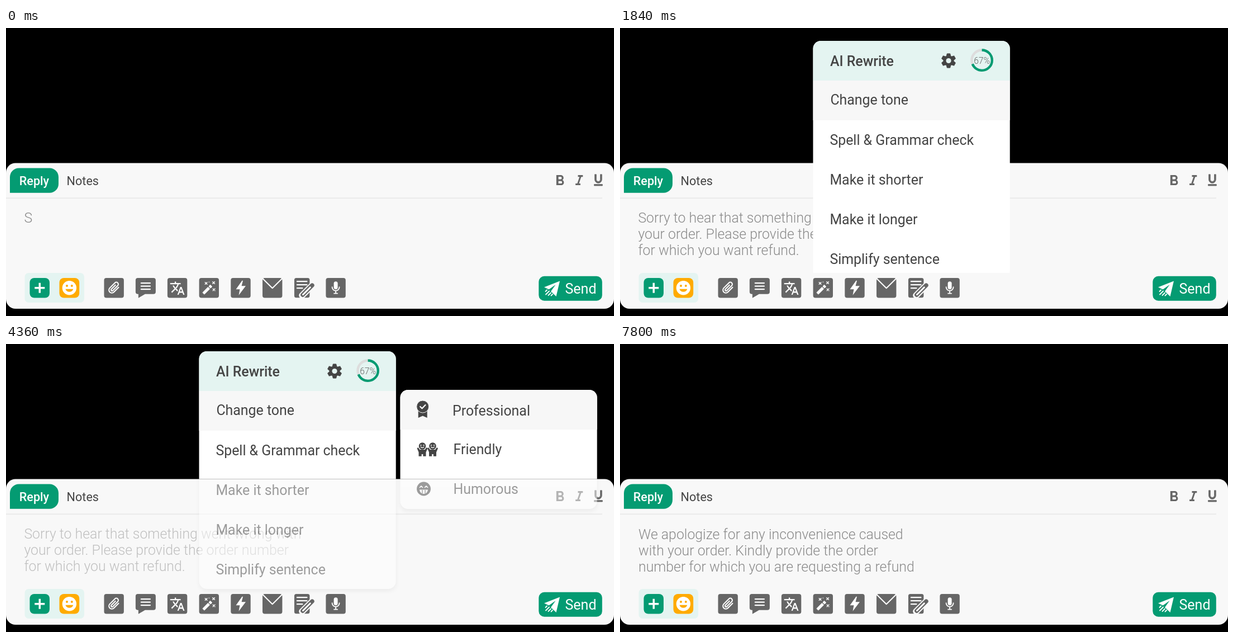
An HTML page for the animation above (9.04 s loop, 1088x515 px).

```html
<!DOCTYPE html>
<html lang="en">
<head>
<meta charset="utf-8">
<title>AI Rewrite</title>
<style>
html, body { margin: 0; width: 100%; height: 100%; overflow: hidden; background: #000; }
svg { display: block; font-family: Roboto, sans-serif; }
text { white-space: pre; }
.green { fill: #049b72; }
.grey { fill: #666; }
.mint { fill: #e4f4f1; }
.line { fill: none; stroke: #fff; stroke-linecap: round; stroke-linejoin: round; }
.white { fill: #fff; }
.dark { fill: #444; }
.item { fill: #444; font-size: 24.9px; }
.tab { font-size: 21.6px; }
.draft { fill: #8a8a8a; font-size: 24.85px; font-weight: 300; }
</style>
</head>
<body>
<svg width="1088" height="515" viewBox="0 0 1088 515">
  <defs>
    <filter id="blur" x="-10%" y="-10%" width="120%" height="120%"><feGaussianBlur stdDeviation="4"/></filter>
    <clipPath id="above"><rect width="1088" height="241"/></clipPath>
    <clipPath id="below"><rect y="241" width="1088" height="261"/></clipPath>
    <clipPath id="backed"><rect y="241" width="1088" height="261"/><rect x="346" y="13" width="352" height="228"/></clipPath>
    <clipPath id="open"><rect x="698" width="390" height="241"/></clipPath>
    <clipPath id="window"><rect id="windowBox" x="345" width="353" height="438"/></clipPath>
    <clipPath id="menuShape"><rect x="345.5" y="13" width="352.2" height="425" rx="14"/></clipPath>
    <clipPath id="toneShape"><rect x="705.5" y="82" width="352.2" height="213" rx="14"/></clipPath>

    <g id="menu"><g id="rise">
      <rect id="menuShadow" x="346" y="15" width="352" height="427" rx="15" filter="url(#blur)"/>
      <g clip-path="url(#menuShape)">
        <rect class="white" x="345" y="13" width="353" height="425"/>
        <rect class="mint" x="345" y="13" width="353" height="71"/>
        <rect x="345" y="84" width="353" height="71" fill="#f7f7f7"/>
      </g>
      <text class="item" x="376" y="58" font-weight="500">AI Rewrite</text>
      <g id="gear" class="dark" transform="translate(588 48.5)"></g>
      <g fill="none" stroke-width="4.3">
        <circle cx="647.6" cy="47.7" r="18.2" stroke="#ddd"/>
        <circle cx="647.6" cy="47.7" r="18.2" stroke="#049b72" pathLength="100" stroke-dasharray="69 100" transform="rotate(-90 647.6 47.7)"/>
      </g>
      <text x="647.6" y="54" font-size="15.6" font-weight="300" fill="#666" text-anchor="middle">67%</text>
      <g id="items"></g>
    </g></g>

    <g id="tone"><g id="slide">
      <rect x="705.5" y="84" width="352" height="215" rx="13" filter="url(#blur)" opacity=".1"/>
      <g clip-path="url(#toneShape)">
        <rect class="white" x="705" y="82" width="353" height="213"/>
        <rect x="705" y="82" width="353" height="71" fill="#f7f7f7"/>
      </g>
      <text class="item" x="799" y="128">Professional</text>
      <text class="item" x="800.5" y="197">Friendly</text>
      <text class="item" x="800.5" y="268">Humorous</text>
      <g transform="translate(745.7 112)">
        <path class="dark" d="M-8 6V20L0 16.500 8 20V6z"/>
        <circle class="dark" r="11" stroke="#f7f7f7" stroke-width="1"/>
        <path class="line" stroke-width="2.2" d="M-4.500 0l3.300 3.300 6-6.200"/>
      </g>
      <g id="friend" transform="translate(745 188)">
        <circle class="dark" cy="-5.500" r="6.300"/>
        <path class="dark" d="M-9.500-1.500L-7.500-3-4.500 1H4.500L7.500-3 9.500-1.500 6.500 5.500V12.800H1.300V9H-1.300V12.800H-6.500V5.500z"/>
        <path class="line" stroke-width="1.3" d="M-3.300-7h1.500M1.800-7h1.500M-2.800-4q2.800 2.800 5.600 0"/>
      </g>
      <use href="#friend" x="18.500"/>
      <g transform="translate(747.5 259)">
        <circle class="dark" r="12.5"/>
        <path class="line" stroke-width="1.7" d="M-7-2.500l2.500-2.500 2.500 2.500M2-2.500l2.500-2.500 2.500 2.500"/>
        <path class="white" d="M-7.500 1.500h15a7.500 7.500 0 0 1-15 0z"/>
        <path stroke="#444" stroke-width="1.3" d="M-2.500 2v6.500M2.500 2v6.500"/>
      </g>
    </g></g>
  </defs>

  <rect y="241.500" width="1088" height="260.500" rx="17" fill="#f8f8f8"/>
  <rect y="303.300" width="1067" height="1.800" fill="#e9e9e9"/>
  <path class="green" d="M7 294.700V266.500a16 16 0 0 1 16-16H78a16 16 0 0 1 16 16V278.700a16 16 0 0 1-16 16z"/>
  <text class="tab white" x="50.500" y="281" font-weight="500" text-anchor="middle">Reply</text>
  <text class="tab dark" x="108.600" y="281">Notes</text>

  <g class="grey">
    <path transform="translate(976 258) scale(1.26 1.28)" d="M15.600 10.790c.97-.67 1.650-1.770 1.650-2.790 0-2.260-1.750-4-4-4H7v14h7.040c2.090 0 3.710-1.700 3.710-3.790 0-1.520-.86-2.820-2.150-3.420zM10 6.300h3a1.700 1.700 0 0 1 0 3.400h-3zM13.500 15.700H10v-3.400h3.500a1.700 1.700 0 0 1 0 3.400z"/>
    <path transform="translate(1012.500 258) scale(1.1 1.28)" d="M10 4v2.400h2.500l-3.600 9.200H6V18h8v-2.400h-2.300l3.600-9.200H18V4z"/>
    <path transform="translate(1047.200 258.500) scale(1.06 1.11)" stroke="#666" stroke-width=".7" d="M12 17c3.310 0 6-2.690 6-6V3h-2.600v8a3.400 3.400 0 0 1-6.800 0V3H6v8c0 3.310 2.690 6 6 6zM5 19v2.200h14V19z"/>
  </g>

  <rect class="mint" x="33.500" y="438" width="106.500" height="53" rx="7"/>
  <rect class="green" x="42.500" y="447" width="35.500" height="35.500" rx="8"/>
  <path stroke="#fff" stroke-width="3.500" d="M51.300 464.700h18M60.300 455.700v18"/>
  <rect x="95.500" y="447" width="35.700" height="35.500" rx="8" fill="#ffab00"/>
  <g transform="translate(113.400 464.700)" fill="#ffab00">
    <circle class="white" r="12.700"/>
    <circle cx="-4.400" cy="-3.600" r="2"/><circle cx="4.400" cy="-3.600" r="2"/>
    <path d="M-7 2h14a7.400 7.400 0 0 1-14 0z"/>
  </g>

  <g id="tools"></g>

  <rect class="green" x="953.300" y="443.700" width="113.500" height="44" rx="10"/>
  <path class="white" d="M991 452.500L963 463.500 971.500 467.500 983.500 459 975 471 984.500 480z"/>
  <path class="line" stroke-width="1.800" d="M972 470.500l-6 6M975 473.500l-4.500 4.500M968 468.500l-2.500 2.500M978 476l-2.500 2.500"/>
  <text class="white" x="1000.500" y="475.300" font-size="25">Send</text>

  <g id="draft"></g>
  <g id="loader" fill="none" stroke-width="4.600">
    <circle cx="42.300" cy="340" r="23.300" stroke="#e4f4e8"/>
    <path id="arc" stroke="#049b72"/>
  </g>

  <g clip-path="url(#window)" id="menuLayer">
    <use href="#menu" id="menuTop" clip-path="url(#above)"/>
    <use href="#menu" id="menuLow" clip-path="url(#below)"/>
  </g>
  <use href="#tone" id="toneOpen" clip-path="url(#open)"/>
  <use href="#tone" id="toneBacked" clip-path="url(#backed)"/>
</svg>

<script>
const LOOP = 9040, STEP = 40;
const $ = id => document.getElementById(id);
const attr = (id, name, value) => $(id).setAttribute(name, value);
const ramp = (t, from, to) => Math.min(1, Math.max(0, (t - from) / (to - from)));
const smooth = p => p * p * (3 - 2 * p);

const first = [
  'Sorry to hear that something went wrong with',
  'your order. Please provide the order number',
  'for which you want refund.'
];
const second = [
  'We apologize for any inconvenience caused',
  'with your order. Kindly provide the order',
  'number for which you are requesting a refund'
];
const size = lines => lines.join('').length;

// Toolbar glyphs, drawn around the centre of each tile
const tile = '<rect class="grey" x="-17.700" y="-17.700" width="35.400" height="35.400" rx="4"/>';
const line = (width, d, extra = '') => `<path class="line" stroke-width="${width}" d="${d}" ${extra}/>`;
const solid = (cls, d, extra = '') => `<path class="${cls}" d="${d}" ${extra}/>`;
const tools = [
  tile + line(1.9, 'M4.800-6V5a4.800 4.800 0 0 1-9.600 0V-7a3.300 3.300 0 0 1 6.600 0V4.500a1.700 1.700 0 0 1-3.400 0V-5', 'transform="rotate(45) scale(1.08)"'),
  solid('grey', 'M-14-17.700H14a4 4 0 0 1 4 4V7a4 4 0 0 1-4 4H-1L-13 18V11H-14a4 4 0 0 1-4-4V-13.700a4 4 0 0 1 4-4z') +
    line(2.3, 'M-8-8.500H8M-8-3H8M-8 2.500H8'),
  tile + solid('white', 'M12.870 15.070l-2.540-2.510.03-.03c1.740-1.940 2.980-4.170 3.710-6.530H17V4h-7V2H8v2H1v2h11.170C11.500 7.920 10.440 9.750 9 11.350 8.070 10.320 7.300 9.190 6.690 8h-2c.73 1.630 1.730 3.170 2.980 4.560l-5.090 5.020L4 19l5-5 3.110 3.110zM18.500 10h-2L12 22h2l1.120-3h4.750L21 22h2zM15.880 17l1.620-4.330L19.120 17z',
    'transform="translate(-14 -13.500) scale(1.17)"'),
  tile + '<g transform="rotate(-45)"><rect class="white" x="-14.500" y="-2.600" width="14.500" height="5.200" rx="1"/><rect class="white" x="1.300" y="-2.600" width="4.500" height="5.200" rx="1"/></g>' +
    line(1.5, 'M-7-10l3.600 3.600M-3.400-10L-7-6.400M6.500-11l3.600 3.600M10.100-11L6.500-7.400M7 1.500l3.600 3.600M10.600 1.500L7 5.100M0-10.500l.1.1'),
  tile + solid('white', 'M2.500-13L-8.500 2.500H-1.500L-3.500 13 9 -3.500H1.500L4-13z'),
  tile + line(2, 'M-17.700-17L0 .500 17.700-17'),
  '<rect class="grey" x="-17.500" y="-17.700" width="27.500" height="35.200" rx="3.500"/>' +
    line(2.2, 'M-12.500-11.500H5M-12.500-5.500H5M-12.500 .500H-3') +
    line(11.5, 'M14.500-4.500L-3.500 13.500', 'style="stroke:#f8f8f8"') +
    line(7.5, 'M14.500-4.500L-2.500 12.500', 'style="stroke:#666"') +
    line(2.8, 'M11-1L-2 12'),
  tile + '<rect class="white" x="-3.500" y="-11.500" width="7" height="14" rx="3.500"/>' +
    line(1.8, 'M-6.500-1.500a6.500 6.500 0 0 0 13 0M0 5.500V10M-3 10H3')
];
$('tools').innerHTML = tools.map((glyph, i) =>
  `<g transform="translate(${193.2 + i * 56.7} 464.700)">${glyph}</g>`).join('');

const items = ['Change tone', 'Spell & Grammar check', 'Make it shorter', 'Make it longer', 'Simplify sentence'];
$('items').innerHTML = items.map((label, i) =>
  `<text class="item" x="${i ? 375.4 : 376.4}" y="${i ? 128 + 71 * i : 126.5}">${label.replace('&', '&amp;')}</text>`).join('');

$('gear').innerHTML = '<circle r="9.400"/>' +
  [0, 60, 120, 180, 240, 300].map(a =>
    `<path d="M-4-7L-2.700-12.600H2.700L4-7z" stroke="#444" stroke-linejoin="round" transform="rotate(${a})"/>`).join('') +
  '<circle class="mint" r="4.600"/>';

$('draft').innerHTML = first.map(() => '<text class="draft"></text>').join('');
const rows = [...$('draft').children];

function type(lines, count, x, y) {
  rows.forEach((row, i) => {
    row.setAttribute('x', x);
    row.setAttribute('y', y + 29 * i);
    row.textContent = lines[i].slice(0, Math.max(0, count));
    count -= lines[i].length;
  });
}

// Arc from the top, clockwise, covering part of a turn
function arcPath(part) {
  const r = 23.3, a = Math.min(part, 0.9999) * 2 * Math.PI;
  return `M42.300 ${340 - r}A${r} ${r} 0 ${part > 0.5 ? 1 : 0} 1 ${42.3 + r * Math.sin(a)} ${340 - r * Math.cos(a)}`;
}

// Over the empty background, half-transparent parts are either shown or hidden
const hard = alpha => alpha >= 0.5 ? 1 : 0;

function render(t) {
  const tick = Math.floor(t / STEP) * STEP;
  const stay = 1 - smooth(ramp(t, 4100, 4630));

  if (t < 5000) {
    type(first, Math.round(1 + (size(first) - 1) * ramp(tick, 0, 760)), 32.4, 348.4);
    attr('draft', 'opacity', stay);
  } else {
    type(second, Math.round(size(second) * ramp(tick, 6360, 7800)), 33, 349.4);
    attr('draft', 'opacity', 1);
  }

  const below = Math.round(425 * Math.pow(1 - ramp(t, 1120, 2198), 3.4));
  const settled = t >= 2080;
  attr('rise', 'transform', `translate(0 ${below})`);
  attr('menuShadow', 'opacity', 0.1 * ramp(t, 2080, 2400));
  attr('windowBox', 'x', settled ? 0 : 345);
  attr('windowBox', 'width', settled ? 1088 : 353);
  attr('windowBox', 'height', settled ? 515 : 438);
  $('menuLayer').style.display = t > 1120 && stay > 0 ? '' : 'none';
  attr('menuTop', 'opacity', hard(stay));
  attr('menuLow', 'opacity', stay);

  const enter = smooth(ramp(t, 2710, 3180));
  const tone = enter * stay;
  attr('slide', 'transform', `translate(${-56 * (1 - enter)} 0)`);
  attr('toneOpen', 'opacity', hard(tone));
  attr('toneBacked', 'opacity', tone);

  const left = 1 - ramp(t, 4760, 5960);
  attr('loader', 'opacity', t < 6400 ? ramp(t, 4640, 4760) : 0);
  attr('arc', 'd', left > 0 ? arcPath(left) : '');
}

function frame() {
  render(performance.now() % LOOP);
  requestAnimationFrame(frame);
}
frame();
</script>
</body>
</html>
```
